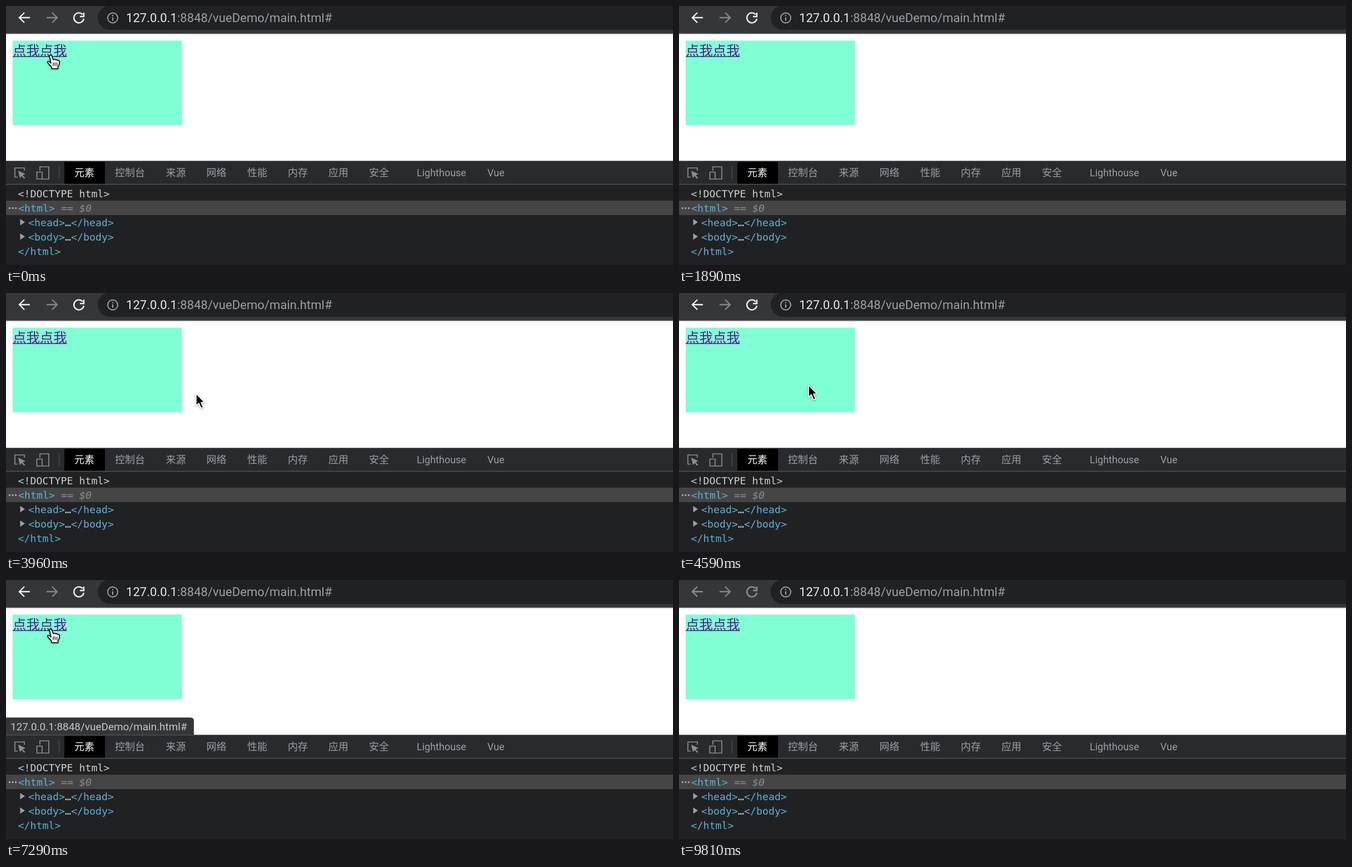
These frames come from a looping animation (1200x467 px, 9900 ms). An HTML page:

```html
<!DOCTYPE html>
<html lang="zh-CN">
<head>
<meta charset="utf-8">
<style>
html, body { margin: 0; width: 100%; height: 100%; overflow: hidden; background: #fff; }
body { position: relative; }
svg, #layer { position: absolute; left: 0; top: 0; width: 1200px; height: 467px; overflow: hidden; }
text, #dialog { font-family: Roboto, "Noto Sans CJK SC", "Noto Sans CJK", sans-serif; white-space: pre; }
.tabs text { font-size: 18px; fill: #9aa0a6; }
.code text { font: 18.27px "DejaVu Sans Mono", monospace; fill: #5db0d7; }
.line { fill: none; stroke-width: 2.4; }
#layer { perspective: 1000px; perspective-origin: 1098px 223px; }
#dialog {
  position: absolute; left: 755px; top: 8px; width: 686px; height: 215px;
  border-radius: 7px; background: #292a2d; color: #fff;
  box-shadow: 0 3px 14px rgba(0, 0, 0, .35); transform-origin: 50% 100%;
}
#dialog div { position: absolute; left: 24px; line-height: 30px; }
#title { top: 27px; font-size: 23.6px; }
#message { top: 77px; font-size: 20.9px; }
</style>
</head>
<body>
<svg viewBox="0 0 1200 467">
  <rect width="1200" height="467" fill="#fff"/>
  <rect x="12" y="62.5" width="304.5" height="152.5" fill="#7fffd4"/>
  <text x="12" y="89" font-size="24.4" fill="#551a8b">点我点我</text>
  <path d="M12 91.3H109.5" stroke="#551a8b" stroke-width="1.6"/>

  <g id="highlight">
    <rect y="50" width="1200" height="177" fill="#6fa8dc" opacity=".66"/>
    <g style="filter:drop-shadow(0 1px 4px rgba(0,0,0,.3))">
      <path d="M6 236H21L31 227L41 236H180Q183 236 183 239V266Q183 269 180 269H6Q3 269 3 266V239Q3 236 6 236Z" fill="#fff"/>
    </g>
    <text x="14" y="259" font-size="17" fill="#881280">html<tspan x="76" fill="#5f6368">1440 × 116</tspan></text>
  </g>

  <rect width="1200" height="50" fill="#35363a"/>
  <rect y="49" width="1200" height="1.5" fill="#606164"/>
  <rect x="165" y="-1" width="1100" height="44" rx="22" fill="#202124"/>
  <g class="line">
    <path class="btn" d="M43 21H25M33 12L24 21L33 30"/>
    <path d="M73 21H91M83 12L92 21L83 30" stroke="#85878a"/>
    <path class="btn" d="M138 15.5A9 9 0 1 0 140 23"/>
    <path class="btn" d="M140 12V19H133" />
    <circle cx="192" cy="21.5" r="9" stroke="#9aa0a6" stroke-width="2"/>
    <path d="M192 20.5V26.5M192 16.3V18.6" stroke="#9aa0a6" stroke-width="2.2"/>
  </g>
  <text x="216" y="29" font-size="22.1" fill="#9aa0a6"><tspan fill="#e8eaed">127.0.0.1</tspan>:8848/vueDemo/main.html#</text>

  <g id="bubble">
    <path d="M0 248H332Q338 248 338 254V280H0Z" fill="#35363a"/>
    <text x="8" y="270.5" font-size="18.95" fill="#c4c7ca">127.0.0.1:8848/vueDemo/main.html#</text>
  </g>

  <g class="tabs">
    <rect y="280" width="1200" height="187" fill="#202123"/>
    <rect y="280" width="1200" height="41" fill="#282a2d"/>
    <path d="M0 279.7H1200M0 321.5H1200" stroke="#505256" stroke-width="1.3"/>
    <rect x="105" y="281" width="73" height="39.5" fill="#000"/>
    <path d="M95.5 289V312" stroke="#494c50" stroke-width="1.5"/>
    <g class="line" stroke="#8b8f94" style="stroke-width:1.7">
      <path d="M21 308.5H16V292H33V297"/>
      <path d="M22 297L35 303L30 305L34.5 310L32.5 311.5L28 306.5L25 310.5Z" fill="#8b8f94" stroke="none"/>
      <path d="M61 297V290H77V312H66M55.5 299.5H65V312H55.5Z"/>
    </g>
    <text x="123" y="306.5" font-weight="500" style="fill:#fff">元素</text>
    <text x="196" y="306.5">控制台</text>
    <text x="287.5" y="306.5">来源</text>
    <text x="360.5" y="306.5">网络</text>
    <text x="434" y="306.5">性能</text>
    <text x="507" y="306.5">内存</text>
    <text x="580" y="306.5">应用</text>
    <text x="653" y="306.5">安全</text>
    <text x="739" y="306.5">Lighthouse</text>
    <text x="866" y="306.5">Vue</text>
  </g>

  <g class="code">
    <rect y="351" width="1200" height="26" fill="#454545"/>
    <text x="21.5" y="345" style="fill:#cdcfd1">&lt;!DOCTYPE html&gt;</text>
    <path d="M5 364.5H19" stroke="#a5a8ab" stroke-width="2.8" stroke-dasharray="2.8 2.8"/>
    <text x="22" y="371">&lt;html&gt;<tspan fill="#8b8d90"> == <tspan font-style="italic">$0</tspan></tspan></text>
    <path d="M25.5 384V395.5L34 389.7ZM25.5 410V421.5L34 415.7Z" fill="#9aa0a6"/>
    <text x="40" y="397">&lt;head&gt;<tspan fill="#d5d7d9">…</tspan>&lt;/head&gt;</text>
    <text x="40" y="423">&lt;body&gt;<tspan fill="#d5d7d9">…</tspan>&lt;/body&gt;</text>
    <text x="21.5" y="449">&lt;/html&gt;</text>
  </g>
</svg>

<div id="layer"><div id="dialog">
  <div id="title">127.0.0.1:8848 显示</div>
  <div id="message"></div>
</div></div>

<svg viewBox="0 0 1200 467">
  <g id="cursor" stroke-linejoin="round" style="filter:drop-shadow(0 1.5px 1.5px rgba(0,0,0,.4))">
    <path id="arrow" d="M0 0V22L5 17.5L9 26.5L13 25L9 16H15.5Z" fill="#000" stroke="#fff" stroke-width="1.7"/>
    <g id="hand" stroke="#000" stroke-width="1.6">
      <path d="M-2 2Q0-1 2.5 2L5 9Q7 7 9 9Q11 8 12.5 10Q15 9 16 12Q17 17 13.5 21V25H2V22Q-2 18-5 14Q-6 11-2.5 12L1 15Z" fill="#fff"/>
      <path d="M5 14V20M8.3 14V20M11.6 14V20" fill="none" stroke-width="1.3"/>
    </g>
  </g>
</svg>

<script>
const LOOP = 9900, STEP = 90, FADE = 186;
const $ = id => document.getElementById(id);

// Pointer trips: [ms, x, y]; the pointer is hidden between trips
const trips = [
  [[0, 80, 88], [360, 80, 88], [800, 1300, 180]],
  [[3000, 1098, 480], [3060, 1095, 465], [3150, 1000, 380], [3330, 700, 270], [3700, 420, 190],
   [4300, 240, 170], [4590, 233, 166], [5000, 233, 166], [5400, 1300, 190]],
  [[6300, 1230, 190], [6570, 630, 150], [7000, 120, 102], [7200, 80, 88], [8190, 80, 88],
   [8370, 1141, 385], [8450, 1220, 480]]
];
// Alerts: [message, opens, closes]
const alerts = [['11111111', 270, 900], ['22222222', 1100, 1620], ['22222222', 4900, 5820]];

const clamp = v => Math.max(0, Math.min(1, v));
const within = (t, a, b) => t >= a && t < b;
const show = (id, on) => $(id).style.display = on ? '' : 'none';

function pointer(t) {
  for (const trip of trips)
    for (let i = 1; i < trip.length; i++) {
      const [t0, x0, y0] = trip[i - 1], [t1, x1, y1] = trip[i];
      if (within(t, t0, t1)) {
        const k = (t - t0) / (t1 - t0);
        return [x0 + (x1 - x0) * k, y0 + (y1 - y0) * k];
      }
    }
}

function drawDialog(t) {
  const alert = alerts.find(([, a, b]) => within(t, a, b + FADE));
  show('dialog', alert);
  if (!alert) return;
  const [message, opens, closes] = alert;
  const k = Math.min(clamp((t - opens) / FADE), clamp(1 - (t - closes) / FADE));
  $('message').textContent = message;
  $('dialog').style.opacity = k;
  $('dialog').style.transform = `rotateX(${23.4 * (1 - k)}deg)`;
}

function drawCursor(t) {
  const p = pointer(t);
  show('cursor', p);
  if (!p) return;
  const [x, y] = p, onLink = within(x, 12, 110) && within(y, 66, 96);
  $('cursor').setAttribute('transform', `translate(${x} ${y})`);
  show('hand', onLink);
  show('arrow', !onLink);
}

function draw(now) {
  const t = Math.floor(now % LOOP / STEP) * STEP;
  drawDialog(t);
  drawCursor(t);
  show('highlight', within(t, 3150, 3400) || within(t, 8370, 8550));
  show('bubble', within(t, 180, 1200) || within(t, 7290, 8900));
  const tone = t >= 9360 ? '#8f9194' : '#f1f3f4';
  document.querySelectorAll('.btn').forEach(b => b.setAttribute('stroke', tone));
  requestAnimationFrame(draw);
}
requestAnimationFrame(draw);
</script>
</body>
</html>
```
